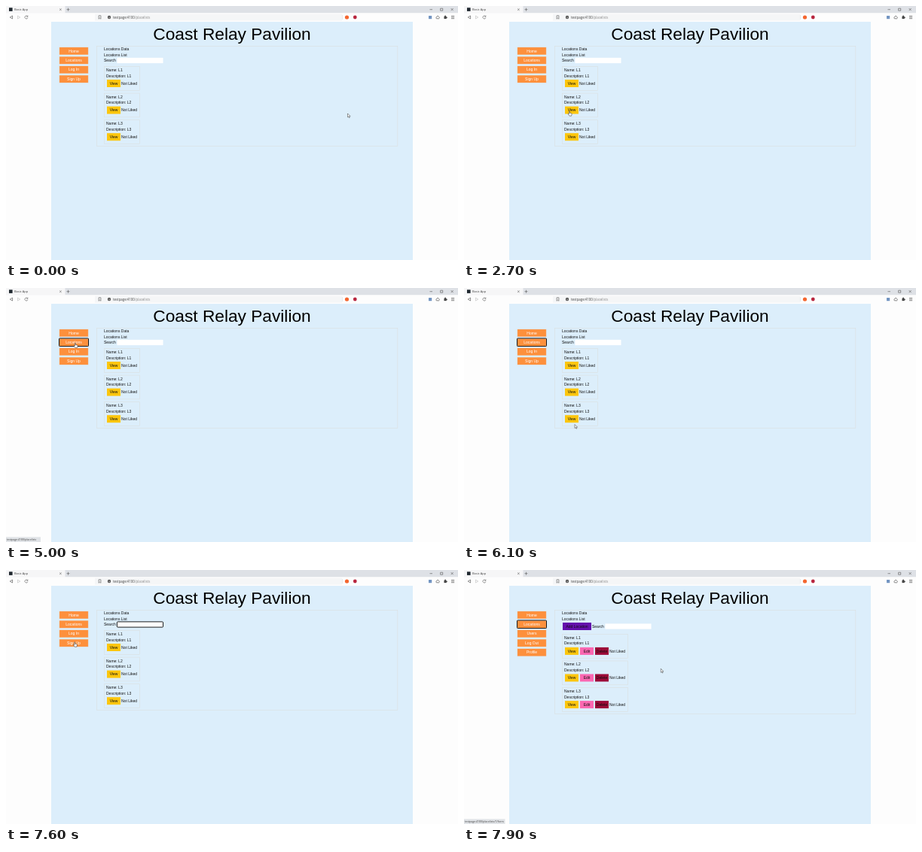
These frames come from a looping animation (600 px wide and 338 px high, 8 s). An HTML page:

```html
<!DOCTYPE html>
<html lang="en">
<head>
<meta charset="utf-8">
<title>Locations</title>
<style>
  html, body { margin: 0; width: 100%; height: 100%; overflow: hidden; background: #fdfdfd; }
  svg { display: block; width: 100%; height: 100%; }
  text { font: 5px "Liberation Sans", Arial, sans-serif; fill: #111; white-space: pre; }
  .ui { font-family: "Open Sans", "Noto Sans", sans-serif; font-size: 4px; fill: #444; }
  .mid { text-anchor: middle; }
</style>
</head>
<body>
<svg id="stage" viewBox="0 0 600 338"></svg>
<script>
const LOOP = 8000, STEP = 100;
const HOST = "testpage:4100", PAGE = "/placelists";
const stage = document.getElementById("stage");

const rect = (x, y, w, h, fill, extra = "") =>
  `<rect x="${x}" y="${y}" width="${w}" height="${h}" fill="${fill}" ${extra}/>`;
const text = (x, y, s, extra = "") => `<text x="${x}" y="${y}" ${extra}>${s}</text>`;
const dot = (x, y, r, fill) => `<circle cx="${x}" cy="${y}" r="${r}" fill="${fill}"/>`;
const line = (d, color = "#555", w = 0.6) =>
  `<path d="${d}" fill="none" stroke="${color}" stroke-width="${w}"/>`;
const frame = (x, y, w, h) =>
  rect(x, y, w, h, "none", 'stroke="#dbdfdf" stroke-width=".6"');
const button = (x, y, w, fill, label) =>
  rect(x, y, w, 10, fill) + text(x + w / 2, y + 6.8, label, 'class="mid"');

function browserBar() {
  return rect(0, 0, 600, 9.5, "#dee1e6") + rect(0, 0, 78.5, 10, "#f6f6f7") +
    rect(0, 9.5, 600, 11.5, "#fdfdfd") + rect(118, 10.7, 328, 8.8, "#f5f6f7") +
    rect(4, 2.3, 4.6, 4.6, "#20282f") +
    text(11, 6.1, "Basic App", 'class="ui"') +
    line("M71.2 3.5l2.4 2.4m0-2.4l-2.4 2.4M80.5 4.7h4M82.5 2.7v4") +
    line("M562.5 4.7h3.5M576.7 3.2h3v3h-3zM590.7 3.1l3 3m0-3l-3 3") +
    line("M8.6 13l-3.4 2 3.4 2z", "#444") +
    line("M15.4 13l3.4 2-3.4 2z", "#bbb") +
    line("M28.6 13.8a2 2 0 1 0 .3 1.8M28.9 12.6v1.6h-1.7") +
    line("M123.1 12.8h2.8v4.4l-1.4-1.2-1.4 1.2z") +
    dot(137, 15, 2.2, "#555") + rect(136.7, 14.6, 0.7, 1.6, "#fff") +
    text(142, 16.6, `${HOST}<tspan fill="#888">${PAGE}</tspan>`, 'class="ui" style="font-size:4.4px"') +
    line("M446.5 12v6", "#ccc", 0.4) +
    dot(452.5, 15, 2.6, "#f4662f") + dot(463.3, 15, 2.4, "#b8263f") +
    rect(561, 13, 4.2, 4.2, "#7395c2") +
    line("M571.5 16.8a1.5 1.5 0 0 1 .2-2.5a1.5 1.5 0 0 1 2.8 0a1.4 1.4 0 0 1 .1 2.5z", "#333") +
    rect(581.5, 13.8, 3.2, 3.3, "#444") + dot(583.1, 13.4, 0.9, "#444") + dot(585, 15.4, 0.8, "#444") +
    line("M591 13.3h4.2M591 15h4.2M591 16.7h4.2", "#444");
}

const backdrop = rect(0, 0, 600, 338, "#fdfdfd") + browserBar() +
  rect(60, 21, 480, 317, "#dceefb") +
  text(300, 45.3, "Coast Relay Pavilion", 'class="mid" style="font-size:22.7px;fill:#000"') +
  text(130, 59.2, "Locations Data") + text(130, 66.7, "Locations List");

function nav(labels, focus) {
  return labels.map((s, i) => {
    const y = 55 + i * 12.45;
    const ring = s === focus
      ? rect(70.5, y - 0.5, 39, 10.6, "none", 'stroke="#151515" stroke-width="1" rx=".8"') : "";
    return rect(70.6, y - 0.3, 38.8, 10.3, "#e6cdb9") +
      rect(71.1, y + 0.1, 37.8, 9.5, "#fd903c") + ring +
      text(90, y + 6.5, s, 'class="mid" style="fill:#fff"');
  }).join("");
}

function searchBox(x, y, focused) {
  return text(x, y + 5.3, "Search") +
    rect(x + 17.4, y, 61.1, 7.2, "#fff",
      focused ? 'stroke="#111" stroke-width=".95" rx=".9"' : "");
}

function cards(top, width, member) {
  return [0, 1, 2].map(i => {
    const y = top + i * 35.6, n = i + 1;
    return frame(130.3, y, width, 31.8) +
      text(133, y + 6.4, `Name: L${n}`) + text(133, y + 14, `Description: L${n}`) +
      button(134, y + 17.5, 18, "#fcc60d", "View") +
      (member ? button(154, y + 17.5, 18, "#fb67b1", "Edit") +
        button(174, y + 17.5, 18, "#9c0a38", "Delete") : "") +
      text(member ? 193 : 153, y + 24.3, "Not Liked");
  }).join("");
}

function page(t) {
  if (t >= 7700) {
    return nav(["Home", "Locations", "Users", "Log Out", "Profile"], "Locations") +
      frame(120.5, 53.5, 399.3, 138) +
      button(131, 70, 38, "#6410ac", "Add Location") +
      searchBox(170, 71.4, false) + cards(85.4, 87, true);
  }
  const inSearch = t >= 6700;
  const focus = t >= 5000 && !inSearch ? "Locations" : "";
  return nav(["Home", "Locations", "Log In", "Sign Up"], focus) +
    frame(120.5, 53.5, 399.3, 133) +
    searchBox(130, 68.9, inSearch) + cards(80.5, 47, false);
}

// Pointer tip: time, x, y
const path = [
  [0, 453.5, 143], [900, 432, 130.3], [1700, 432.3, 130.5], [2400, 432.3, 130.5],
  [2500, 390, 121], [2600, 265, 119], [2700, 140, 140], [2800, 98.6, 151.7],
  [3400, 97.8, 151.5], [3800, 97.2, 151.5], [4600, 97.2, 151.5], [4900, 92, 73],
  [5300, 92, 74], [5500, 100, 82], [5700, 141, 103], [5900, 143, 139],
  [6100, 147, 181.5], [6400, 150, 172], [6700, 160, 72], [6800, 159.5, 72],
  [7000, 122, 82], [7200, 93, 85], [7400, 92, 95], [7600, 91.3, 96],
  [7700, 150, 94], [7800, 164, 109], [7900, 261.3, 131.3]
];

function tipAt(t) {
  const i = path.findIndex(k => k[0] > t);
  if (i < 0) return path[path.length - 1].slice(1);
  const [a, x, y] = path[i - 1], [b, u, v] = path[i];
  const p = (t - a) / (b - a);
  return [x + (u - x) * p, y + (v - y) * p];
}

const shapes = {
  arrow: '<path d="M0 0v5l1.2-1 .8 1.8 .8-.4-.8-1.7h1.6z" fill="#fff" stroke="#333" stroke-width=".5"/>',
  hand: '<path d="M-.6.3q.6-.8 1.1 0v2l2 .5q.8.3.6 1.2l-.5 2.2h-2.7l-1.9-2.5q.2-.7 1.4.1z" fill="#fff" stroke="#222" stroke-width=".5"/>',
  beam: line("M-1-2.7h2M0-2.7v5.4M-1 2.7h2", "#333", 0.5)
};

function shapeAt(x, y, t) {
  const member = t >= 7700;
  const rows = member ? 5 : 4;
  const ny = y - 55;
  if (x > 71 && x < 109 && ny > 0 && ny < rows * 12.45 && ny % 12.45 < 9.8) return "hand";
  const cy = y - (member ? 102.9 : 98);
  if (x > 134 && x < (member ? 192 : 152) && cy > 0 && cy < 82 && cy % 35.6 < 10) return "hand";
  return !member && x > 147 && x < 208 && y > 69 && y < 76 ? "beam" : "arrow";
}

function status(t) {
  const within = (a, b) => t >= a && t < b;
  const s = within(4900, 5400) ? PAGE : within(5700, 6000) ? PAGE + "/1" :
    within(7100, 7400) ? "/login" : t >= 7800 ? PAGE + "/1/form" : "";
  return s && rect(0, 331.4, s.length > 14 ? 54.5 : 46, 6.6, "#e0e3e7") +
    text(1, 336.2, HOST + s, 'class="ui" style="font-size:3.5px"');
}

function draw(t) {
  const [x, y] = tipAt(t);
  stage.innerHTML = backdrop + page(t) + status(t) +
    `<g transform="translate(${x} ${y})">${shapes[shapeAt(x, y, t)]}</g>`;
}

let last = -1;
function tick() {
  const t = Math.floor(performance.now() % LOOP / STEP) * STEP;
  if (t !== last) draw(last = t);
  requestAnimationFrame(tick);
}
tick();
</script>
</body>
</html>
```
